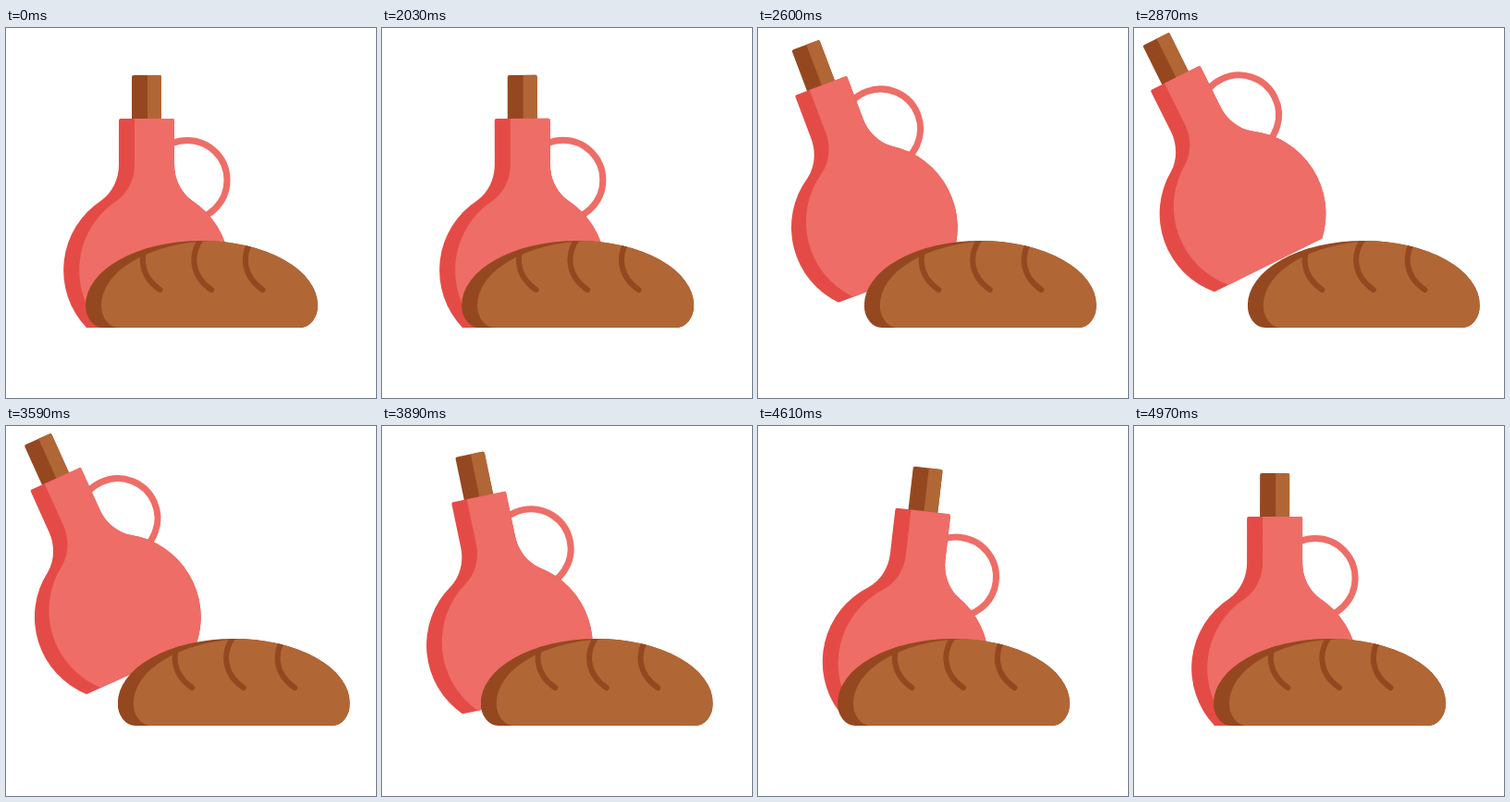
These frames come from a looping animation (400 by 400 pixels, 5000 ms). An HTML page:

```html
<!DOCTYPE html>
<html>
<head>
<meta charset="utf-8">
<style>
  html, body { margin: 0; width: 100%; height: 100%; overflow: hidden; background: #fff; }
  svg { display: block; width: 100vw; height: 100vh; }
</style>
</head>
<body>
<svg viewBox="0 0 400 400">
  <clipPath id="crust">
    <path d="M86 300A125.5 70 0 0 1 337 300A19 24 0 0 1 318 324H105A19 24 0 0 1 86 300Z"/>
  </clipPath>

  <g id="bottle">
    <rect x="136" y="51" width="32" height="50" rx="2" fill="#954820"/>
    <path d="M153 51H166Q168 51 168 53V100H153Z" fill="#b06735"/>
    <circle cx="196" cy="164.5" r="43" fill="none" stroke="#ee6d67" stroke-width="7"/>
    <path fill="#e54b46" d="M122 100Q122 98 124 98H180Q182 98 182 100V148C182 163 189 178 201 186.5
      A90 90 0 0 1 217 324H87A90 90 0 0 1 103 186.5C115 178 122 163 122 148Z"/>
    <path fill="#ee6d67" d="M139 98H180Q182 98 182 100V148C182 163 189 178 201 186.5
      A90 90 0 0 1 217 324H104A90 90 0 0 1 120 186.5C132 178 139 163 139 148Z"/>
  </g>

  <g id="bread">
    <g clip-path="url(#crust)">
      <rect x="86" y="229" width="252" height="96" fill="#954820"/>
      <path fill="#b06735" d="M103 300A125.5 70 0 0 1 220 230.16L220 220H345V330H122V324A19 24 0 0 1 103 300Z"/>
      <g fill="none" stroke="#954820" stroke-width="6" stroke-linecap="round">
        <path id="cut" d="M211 228C199 245 200 268 222 283"/>
        <use href="#cut" x="-55.5"/>
        <use href="#cut" x="55.5"/>
      </g>
    </g>
  </g>
</svg>
<script>
const LOOP = 5000;
const bottle = document.getElementById('bottle');
const bread = document.getElementById('bread');

// Each key: time, bottle angle, bread shift, and the easing handles leading to it.
const keys = [
  { t: 2000, angle: 0, shift: 0 },
  { t: 3150, angle: -28, shift: 39, x1: .32, x2: .35 },
  { t: 4610, angle: 6.6, shift: 0, x1: .65, x2: .4 },
  { t: 5000, angle: 0, shift: 0, x1: .32, x2: .35 }
];

// Cubic bezier easing through (x1, 0) and (x2, 1), solved by bisection.
function ease(p, x1, x2) {
  let lo = 0, hi = 1, s = .5;
  for (let i = 0; i < 24; i++) {
    const r = 1 - s;
    const x = 3 * x1 * s * r * r + 3 * x2 * s * s * r + s ** 3;
    if (x < p) lo = s; else hi = s;
    s = (lo + hi) / 2;
  }
  return s * s * (3 - 2 * s);
}

function poseAt(t) {
  const i = keys.findIndex(k => t < k.t);
  if (i === 0) return keys[0];
  const a = keys[i - 1], b = keys[i];
  const p = ease((t - a.t) / (b.t - a.t), b.x1, b.x2);
  const mix = name => a[name] + (b[name] - a[name]) * p;
  return { angle: mix('angle'), shift: mix('shift') };
}

let start;
function draw(now) {
  start ??= now;
  const { angle, shift } = poseAt((now - start) % LOOP);
  // Leaning left it lifts off on its left corner; leaning right it rocks on the other.
  const tilt = Math.max(0, -angle);
  const lift = tilt * (.79 + .0255 * tilt);
  const pivot = angle < 0 ? 87 : 217;
  bottle.setAttribute('transform', `translate(0 ${-lift}) rotate(${angle} ${pivot} 324)`);
  bread.setAttribute('transform', `translate(${shift} 0)`);
  requestAnimationFrame(draw);
}
requestAnimationFrame(draw);
</script>
</body>
</html>
```
